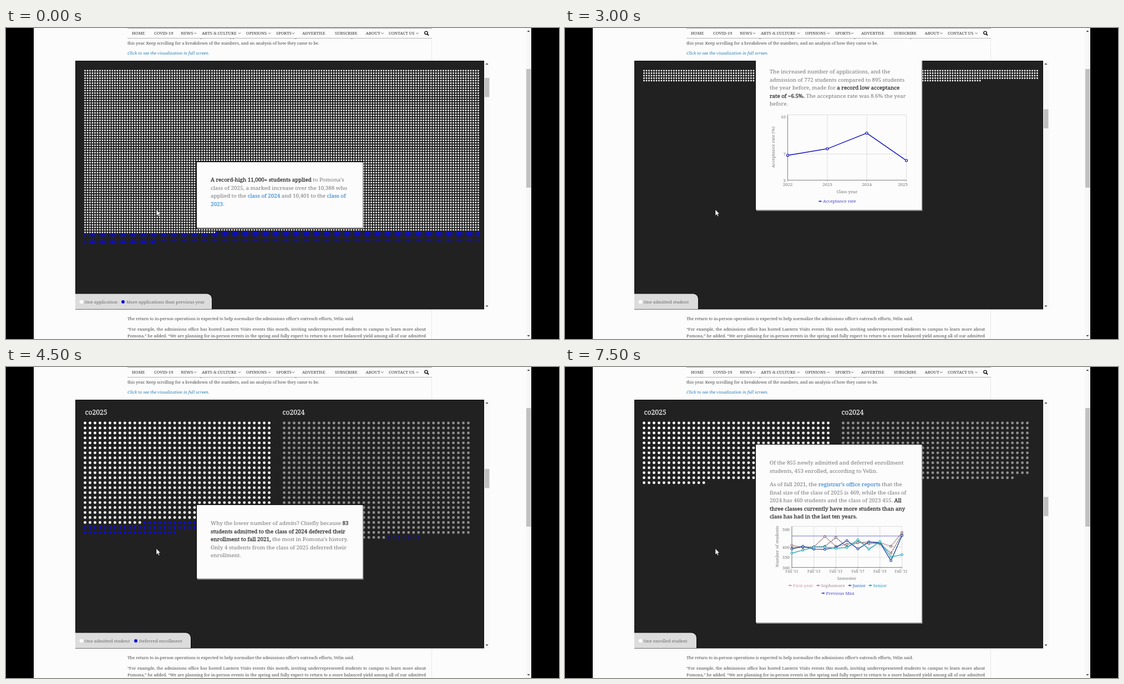
Write an HTML page with a canvas that moves like this. It is 997 px wide and 561 px high and loops after 8 s.

```html
<!DOCTYPE html>
<html lang="en">
<head>
<meta charset="utf-8">
<title>Admissions scrolly</title>
<style>
html, body { margin: 0; width: 100%; height: 100%; overflow: hidden; background: #000; }
canvas { display: block; width: 997px; height: 561px; }
</style>
</head>
<body>
<canvas id="stage" width="997" height="561"></canvas>
<script>
const ctx = document.getElementById("stage").getContext("2d");
const STEP = 500, LOOP = 8000, TRIGGER = 283;
const PAPER = "#fcfcfc", DARK = "#212121", EDGE = "#0c0c0c", BLUE = "#0c0cd8", LINK = "#4a92d6", GREY = "#757575";
// Panel scroll offset at each half second.
const SCROLL = [0, 0, 190, 400, 483, 570, 690, 825, 1115, 1145, 1210, 1280.5, 1530, 1661, 1708, 1762];

function rect(x, y, w, h, color) {
  ctx.fillStyle = color;
  ctx.fillRect(x, y, w, h);
}

function line(points, color, width = 1, dash = []) {
  ctx.beginPath();
  points.forEach(([x, y]) => ctx.lineTo(x, y));
  ctx.strokeStyle = color;
  ctx.lineWidth = width;
  ctx.setLineDash(dash);
  ctx.stroke();
  ctx.setLineDash([]);
}

function shape(points, color) {
  ctx.beginPath();
  points.forEach(([x, y]) => ctx.lineTo(x, y));
  ctx.closePath();
  ctx.fillStyle = color;
  ctx.fill();
}

function circle(x, y, r, color) {
  ctx.beginPath();
  ctx.arc(x, y, r, 0, 7);
  ctx.fillStyle = color;
  ctx.fill();
}

function text(str, x, y, { size = 7.9, color = GREY, align = "left", weight = 0, italic = false, justify = 0 } = {}) {
  ctx.font = `${italic ? "italic " : ""}${size}px "Noto Serif", serif`;
  ctx.textAlign = align;
  ctx.wordSpacing = "0px";
  if (justify) {
    const gap = (justify - ctx.measureText(str).width) / (str.split(" ").length - 1);
    ctx.wordSpacing = gap + "px";
  }
  ctx.fillStyle = color;
  ctx.fillText(str, x, y);
  if (weight) {
    ctx.strokeStyle = color;
    ctx.lineWidth = weight;
    ctx.strokeText(str, x, y);
  }
  const width = ctx.measureText(str).width;
  ctx.wordSpacing = "0px";
  return width;
}

// Lines of copy: *strong* and _link_ may run on over line ends.
function copy(lines, top, offsets) {
  let strong = false, link = false;
  lines.forEach((str, i) => {
    let x = 369;
    for (const part of str.split(/([*_])/)) {
      if (part === "*") strong = !strong;
      else if (part === "_") link = !link;
      else if (part) x += text(part, x, top + offsets(i) + 3.4, {
        size: 9.8,
        color: link ? LINK : strong ? "#333" : GREY,
        weight: strong ? 0.3 : link ? 0.25 : 0
      });
    }
  });
}

function sideLabel(str, x, y) {
  ctx.save();
  ctx.translate(x, y);
  ctx.rotate(-Math.PI / 2);
  text(str, 0, 0, { align: "center" });
  ctx.restore();
}

function plot(points, color, width, r, dash) {
  line(points, color, width, dash);
  for (const [x, y] of points) {
    circle(x, y, r, "#fff");
    ctx.strokeStyle = color;
    ctx.lineWidth = 1.2;
    ctx.stroke();
  }
}

function key(str, x, y, color) {
  line([[x, y], [x + 7, y]], color, 1.2);
  circle(x + 3.5, y, 1.6, color);
  text(str, x + 8.5, y + 2.8, { color });
}

function axes(x0, x1, y0, y1, cols, rows) {
  for (let i = 0; i < cols; i++) {
    const x = x0 + (x1 - x0) * i / (cols - 1);
    line([[x, y0], [x, y1]], "#ddd");
    line([[x, y1], [x, y1 + 2]], "#888");
  }
  rows.forEach(y => line([[x0, y], [x1, y]], "#ddd"));
  line([[x0, y0], [x0, y1], [x1, y1]], "#808080");
}

function rateChart(top) {
  const y = v => top + 228.5 - (v - 5) * 23.6;
  const xs = [401.5, 473, 544, 615.5];
  axes(401.5, 615.5, y(10), y(5), 4, [y(10), y(7)]);
  [[10, 3.5], [7, 0], [5, 0]].forEach(([v, d]) => text(v, 398, y(v) + d + 3, { align: "right" }));
  xs.forEach((x, i) => text(2022 + i, i < 3 ? x : 609, top + 238.5, { align: "center" }));
  plot(xs.map((x, i) => [x, y([6.9, 7.4, 8.6, 6.5][i])]), "#1818c4", 1.5, 2);
  text("Class year", 508.5, top + 251.5, { align: "center" });
  sideLabel("Acceptance rate (%)", 377.5, top + 169);
  key("Acceptance rate", 456.5, top + 266.5, "#4646cc");
}

const CLASSES = [
  ["#86616a", [2, 1], [408, 397, 400, 451, 402, 413, 422, 415, 421, 403, 470]],
  ["#7d6668", [3, 1], [395, 398, 400, 403, 446, 400, 421, 424, 414, 370, 460]],
  ["#173f9e", [], [390, 403, 389, 388, 397, 431, 390, 424, 421, 333, 455]],
  ["#1ca5b5", [], [369, 384, 399, 399, 393, 397, 435, 389, 425, 351, 362]]
];

function sizeChart(top) {
  const y = v => top + 221.5 - (v - 300) * 0.37;
  const x = i => 409 + i * 19.85;
  axes(409, 607.5, y(500), y(300), 6, [500, 400, 350].map(y));
  [[500, 5], [400, 0], [350, 0], [300, 0]].forEach(([v, d]) => text(v, 405, y(v) + d + 3, { align: "right" }));
  for (let i = 0; i < 11; i += 2)
    text("Fall ’" + (11 + i), i < 10 ? x(i) : 606, top + 231, { size: 6.9, align: "center" });
  line([[409, y(453)], [607.5, y(453)]], "#7070d8");
  CLASSES.forEach(([color, dash, values]) =>
    plot(values.map((v, i) => [x(i), y(v)]), color, 1.3, 1.8, dash));
  text("Semester", 508, top + 244, { align: "center" });
  sideLabel("Number of students", 384.5, top + 184);
  key("First-year", 402.5, top + 254, "#d292a8");
  key("Sophomore", 453, top + 254, "#a0849a");
  key("Junior", 510, top + 254, "#2468b8");
  key("Senior", 547, top + 254, "#1c98bc");
  key("Previous Max", 462, top + 268, "#4a4acc");
}

const even = first => i => first + i * 14.5;
const CARDS = [
  { top: 242, height: 118, offsets: even(32), lines: [
    "*A record-high 11,000+ students applied* to Pomona’s",
    "class of 2025, a marked increase over the 10,388 who",
    "applied to the _class of 2024_ and 10,401 to the _class of",
    "2023_."] },
  { top: 736, height: 282, offsets: even(33), chart: rateChart, lines: [
    "The increased number of applications, and the",
    "admission of 772 students compared to 895 students",
    "the year before, made for *a record low acceptance",
    "rate of ~6.5%.* The acceptance rate was 8.6% the year",
    "before."] },
  { top: 1394, height: 132.5, offsets: even(33), lines: [
    "Why the lower number of admits? Chiefly because *83",
    "students admitted to the class of 2024 deferred their",
    "enrollment to fall 2021,* the most in Pomona’s history.",
    "Only 4 students from the class of 2025 deferred their",
    "enrollment."] },
  { top: 1902, height: 321, offsets: i => 33 + i * 14.5 + (i > 1 ? 10 : 0), chart: sizeChart, lines: [
    "Of the 855 newly admitted and deferred enrollment",
    "students, 453 enrolled, according to Velin.",
    "As of fall 2021, the _registrar’s office reports_ that the",
    "final size of the class of 2025 is 469, while the class of",
    "2024 has 460 students and the class of 2023 455. *All",
    "three classes currently have more students than any",
    "class has had in the last ten years.*"] }
];

function drawCard({ top, height, lines, offsets, chart }, scroll) {
  const y = top - scroll;
  if (y > 507 || y + height < 55) return;
  rect(343, y - 1, 301, height + 2, EDGE);
  rect(345, y + 1, 299.5, height + 1, "#8c8c8c");
  rect(344, y, 299, height, PAPER);
  copy(lines, y, offsets);
  if (chart) chart(y);
}

const GAP = 4.487;
const grid = (x, y, cols, gap) => i => [x + i % cols * gap, y + Math.floor(i / cols) * gap];
const tiny = grid(142.5, 77, 159, GAP);
const left = grid(142.5, 101, 38, GAP * 2);
const right = grid(501.5, 101, 38, GAP * 2);
const mix = (a, b, k) => a.map((v, i) => v + (b[i] - v) * k);

function dots(from, to, place, r, color) {
  ctx.beginPath();
  for (let i = from; i < to; i++) {
    const [x, y] = place(i);
    ctx.moveTo(x + r, y);
    ctx.arc(x, y, r, 0, 7);
  }
  ctx.fillStyle = color;
  ctx.fill();
}

// rest: share of the way the moving dots still have to go.
function drawDots(scene, rest) {
  const white = "#fafafa", ash = "#8f8f8f", small = 1.45, big = 2.45;
  if (scene === 0) {
    dots(0, 10388, tiny, small, white);
    dots(10388, 11000, tiny, small, BLUE);
    return;
  }
  if (scene === 1) return dots(0, 772, tiny, small, white);

  text("co2025", 142.5, 86, { size: 12.1, color: "#eee", weight: 0.25 });
  text("co2024", 498.5, 86, { size: 12.1, color: "#eee", weight: 0.25 });
  if (scene === 2) {
    dots(0, 772, i => mix(left(i), tiny(i), rest), big, white);
    dots(772, 855, left, big, BLUE);
    dots(0, 895, right, big, ash);
    dots(895, 902, right, 1.9, BLUE);
  } else {
    dots(0, 386, left, big, white);
    dots(386, 469, i => mix(left(i), left(i + 386), rest), big, white);
    dots(0, 446, right, big, ash);
    dots(446, 453, i => mix(right(i), right(i + 449), rest), big, ash);
  }
}

const LEGENDS = [
  [371, "One application", 211, "More applications than previous year"],
  [240, "One admitted student"],
  [333, "One admitted student", 234, "Deferred enrollment"],
  [237, "One enrolled student"]
];

function drawLegend(scene) {
  const [edge, first, x, second] = LEGENDS[scene];
  ctx.beginPath();
  ctx.roundRect(125, 479.5, edge - 125, 28, [0, 9, 0, 0]);
  ctx.strokeStyle = EDGE;
  ctx.lineWidth = 2;
  ctx.stroke();
  ctx.fillStyle = "#dcdcdc";
  ctx.fill();
  circle(136, 494, 3.3, "#fff");
  text(first, 141.5, 496.7, { color: "#6a6a6a" });
  if (!second) return;
  circle(x, 494, 3, BLUE);
  text(second, x + 6, 496.7, { color: "#6a6a6a" });
}

function scrollbar(x, top, bottom, thumb, size) {
  rect(x, top, 10, bottom - top, "#f8f8f8");
  rect(x + 1, thumb, 8.5, size, "#c1c1c1");
  const c = x + 5;
  shape([[c - 2.5, top + 7], [c + 2.5, top + 7], [c, top + 4.3]], "#444");
  shape([[c - 2.5, bottom - 7], [c + 2.5, bottom - 7], [c, bottom - 4.3]], "#444");
}

const MENU = [
  ["HOME", 227], ["COVID-19", 267], ["NEWS", 315, 341], ["ARTS & CULTURE", 353, 421],
  ["OPINIONS", 433, 475], ["SPORTS", 487, 518], ["ADVERTISE", 534], ["SUBSCRIBE", 593],
  ["ABOUT", 648.5, 678.5], ["CONTACT US", 690, 741.5]
];

function drawPage() {
  rect(0, 0, 997, 561, "#000");
  rect(50, 0, 897, 561, PAPER);
  rect(767, 18, 1, 543, "#e8e8e8");
  const ink = { size: 7.45, color: "#484848" };
  const full = { ...ink, justify: 538 };
  text("The share of students offered a place has dropped at Pomona, even as larger classes arrive on campus for the start of the fall term", 219, 17.8, full);
  text("this year. Keep scrolling for a breakdown of the numbers, and an analysis of how they came to be.", 219, 29.6, ink);
  text("Click to see the visualization in full screen.", 219, 48, { size: 7.5, color: "#2a80b9", italic: true });
  text("The return to in-person operations is expected to help normalize the admissions office’s outreach efforts, Velin said.", 219, 526.6, ink);
  text("“For example, the admissions office has hosted Lantern Visits events this month, inviting underrepresented students to campus to learn more about", 219, 546, full);
  text("Pomona,” he added. “We are planning for in-person events in the spring and fully expect to return to a more balanced yield among all of our admitted", 219, 557.7, full);

  rect(219, 0, 549, 18, PAPER);
  rect(219, 0, 549, 1, "#aaa");
  rect(219, 18, 549, 1, "#b4b4b4");
  for (const [label, x, arrow] of MENU) {
    text(label, x, 11.8, { size: 7.6, color: "#333" });
    if (arrow) line([[arrow - 2, 8.5], [arrow, 10.5], [arrow + 2, 8.5]], "#444", 0.9);
  }
  ctx.beginPath();
  ctx.arc(757.5, 8.8, 2.7, 0, 7);
  ctx.strokeStyle = "#111";
  ctx.lineWidth = 1.4;
  ctx.stroke();
  line([[759.5, 10.8], [762, 13.3]], "#111", 1.7);
  scrollbar(937, 0, 561, 74, 214);
}

function drawCursor(x, y) {
  const arrow = [[0, 0], [0, 11], [2.5, 8.8], [4.2, 12.5], [6, 11.7], [4.3, 8], [7.5, 7.8]]
    .map(([dx, dy]) => [x + dx, y + dy]);
  shape(arrow, "#fff");
  line([...arrow, arrow[0]], "#111", 0.6);
}

const sceneAt = scroll => CARDS.filter(c => c.top - scroll < TRIGGER).length - 1;

function draw(now) {
  const n = Math.floor(now % LOOP / STEP);
  const scroll = SCROLL[n];
  const scene = sceneAt(scroll);
  const rest = n && scene !== sceneAt(SCROLL[n - 1]) ? 0.055 : 0;

  drawPage();
  ctx.save();
  ctx.beginPath();
  ctx.rect(125, 59, 737, 448.5);
  ctx.clip();
  rect(125, 59, 737, 449, EDGE);
  rect(126, 60, 735, 446.5, DARK);
  drawDots(scene, rest);
  CARDS.forEach(card => drawCard(card, scroll));
  drawLegend(scene);
  ctx.restore();
  scrollbar(862, 59, 507.5, 90 + scroll / 12.2, 34.5);
  drawCursor(271, 327.5);
}

const start = performance.now();
function tick() {
  draw(performance.now() - start);
  requestAnimationFrame(tick);
}
tick();
</script>
</body>
</html>
```
